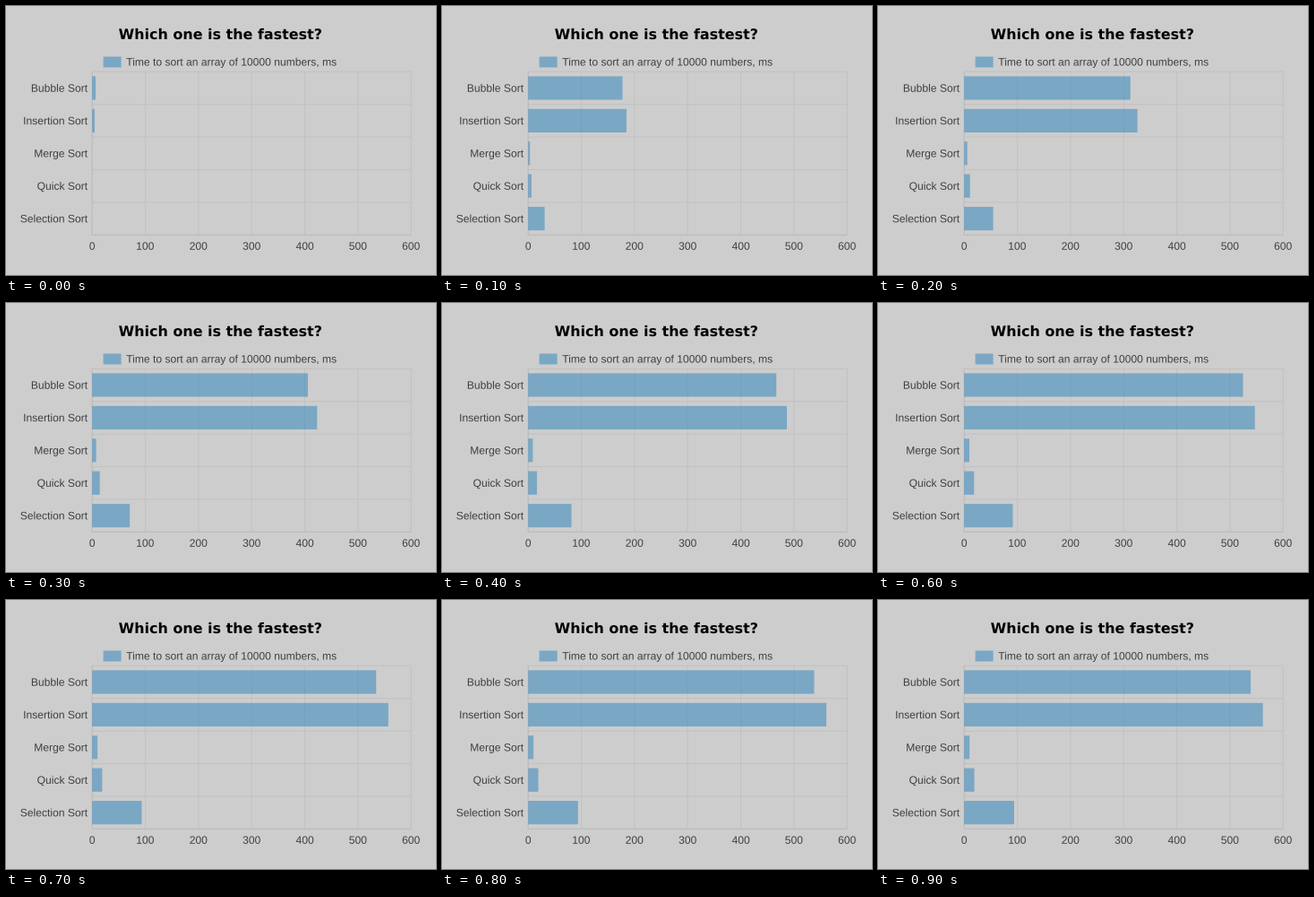
A matplotlib script that plays this animation: 480x300 px, repeating every 1400 ms.

```python
import matplotlib.pyplot as plt
from matplotlib.animation import FuncAnimation
from matplotlib.patches import PathPatch, Rectangle
from matplotlib.textpath import TextPath
from matplotlib.transforms import Affine2D

WIDTH, HEIGHT, DPI = 480, 300, 100
FRAMES, INTERVAL = 14, 100
LAST_STEP = 9  # the chart holds still from here on
LEFT, RIGHT, TOP, BOTTOM = 96.2, 452.2, 73.3, 255.3
MAX_VALUE = 600
SCALE = (RIGHT - LEFT) / MAX_VALUE
BACKGROUND, GRID, AXIS, TEXT = "#cdcdcd", "#c1c1c1", "#b8b8b8", "#404040"
BAR = (41 / 255, 130 / 255, 188 / 255, 0.5)

# name, first visible value, final value (ms)
SORTS = [
    ("Bubble Sort", 6.5, 539),
    ("Insertion Sort", 4.6, 562),
    ("Merge Sort", 0, 10),
    ("Quick Sort", 0, 19),
    ("Selection Sort", 0, 94),
]
ROW = (BOTTOM - TOP) / len(SORTS)
THICKNESS = ROW * 0.72

fig = plt.figure(figsize=(WIDTH / DPI, HEIGHT / DPI), dpi=DPI, facecolor=BACKGROUND)
ax = fig.add_axes([0, 0, 1, 1])
ax.set_xlim(0, WIDTH)
ax.set_ylim(HEIGHT, 0)
ax.axis("off")


def label(x, baseline, text, size=12.1, align=0.5, color=TEXT,
          font="Liberation Sans", weight="normal"):
    """Draw text as outlines, so that it keeps its sub-pixel position."""
    path = TextPath((0, 0), text, size=size, prop={"family": font, "weight": weight})
    box = path.get_extents()
    shift = x - box.x0 - align * box.width
    path = path.transformed(Affine2D().scale(1, -1).translate(shift, baseline))
    ax.add_patch(PathPatch(path, facecolor=color, lw=0, snap=False, zorder=3))


def line(xs, ys, color=GRID):
    ax.plot(xs, ys, color=color, lw=72 / DPI, solid_capstyle="butt",
            snap=False, zorder=1)


def bar(x, y, width, height):
    return ax.add_patch(Rectangle((x, y), width, height, facecolor=BAR, lw=0,
                                  snap=False, zorder=2))


def draw_chart():
    label(239, 37, "Which one is the fastest?", 15.95, color="black",
          font="DejaVu Sans", weight="bold")
    bar(108.6, 56.5, 20, 12)
    label(134.5, 66.5, "Time to sort an array of 10000 numbers, ms", align=0)

    for i in range(len(SORTS) + 1):
        y = TOP + i * ROW
        line([LEFT, RIGHT], [y, y], AXIS if i == len(SORTS) else GRID)
    for value in range(0, MAX_VALUE + 1, 100):
        x = LEFT + value * SCALE
        line([x, x], [TOP, BOTTOM], GRID if value else AXIS)
        label(x, 271.8, str(value))
    for i, (name, _, _) in enumerate(SORTS):
        label(91, TOP + (i + 0.5) * ROW + 4.2, name, align=1)


def ease_out_quart(t):
    return 1 - (1 - t) ** 4


def update(frame):
    step = min(frame, LAST_STEP)
    progress = ease_out_quart(step * INTERVAL / 1000 - 0.005)
    for patch, (_, first, final) in zip(bars, SORTS):
        value = final * progress if step else first
        patch.set_width(value * SCALE)
    return bars


draw_chart()
bars = [bar(LEFT, TOP + (i + 0.5) * ROW - THICKNESS / 2, 0, THICKNESS)
        for i in range(len(SORTS))]
anim = FuncAnimation(fig, update, frames=FRAMES, interval=INTERVAL,
                     init_func=lambda: update(0), repeat=True, repeat_delay=0)
plt.show()
```
